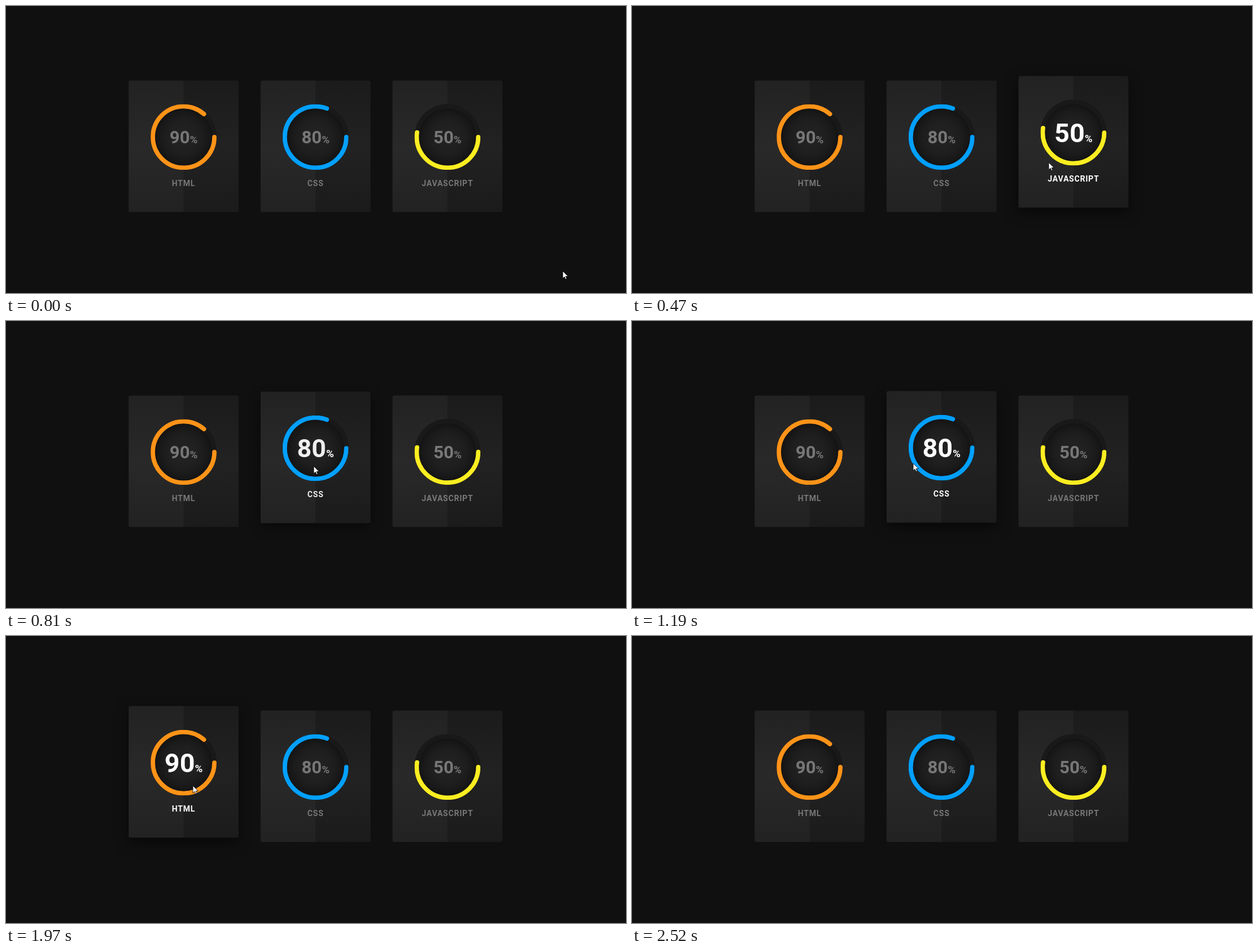
These frames come from a looping animation (1098 px wide and 510 px high, 2.57 s). An HTML page:

```html
<!DOCTYPE html>
<html lang="en">
<head>
<meta charset="utf-8">
<title>Skill cards</title>
<style>
  html, body { margin: 0; width: 100%; height: 100%; overflow: hidden; background: #101010; }
  body { position: relative; font-family: Roboto, sans-serif; font-weight: 700; }
  #row { position: absolute; left: 0; top: 0; transform-origin: 0 0; }
  .card { position: absolute; top: 0; width: 250px; height: 300px; border-radius: 4px;
    background: linear-gradient(#1b1b1b, #222, #1b1b1b); }
  .card::before { content: ""; position: absolute; left: 0; top: 0; width: 50%; height: 100%;
    border-radius: 4px 0 0 4px; background: rgba(255, 255, 255, .03); }
  .dial { position: absolute; left: 50px; top: 54px; width: 150px; height: 150px; border-radius: 50%;
    background: #222; box-shadow: inset 0 0 50px #000; }
  .dial svg { position: absolute; left: 0; top: 0; }
  circle { fill: none; stroke-width: 10; stroke-linecap: round; }
  text { text-anchor: middle; }
  tspan { font-size: 24px; }
  .label { position: absolute; left: 0; top: 225px; width: 100%; text-align: center;
    font-size: 18px; line-height: 20px; letter-spacing: 1px; }
  #cursor { position: absolute; left: 0; top: 0; }
</style>
</head>
<body>
<div id="row"></div>
<svg id="cursor" width="12" height="18" viewBox="-1 -1 12 18">
  <path d="M0 0V13L3 10.2L5 14.6L7 13.7L5.1 9.5H9.3Z" fill="#fff" stroke="#000" stroke-width=".8"/>
</svg>
<script>
const LOOP = 2570, FADE = 155, LAG = 5;
const SCALE = .7788, LEFT = 217.2, TOP = 132.4, PITCH = 300;

const cards = [
  { name: 'HTML', value: 90, arc: 86.5, color: '#ff9318' },
  { name: 'CSS', value: 80, arc: 81, color: '#03a0ff' },
  { name: 'JAVASCRIPT', value: 50, arc: 52.4, color: '#fcee21' }
];

const smooth = x => x * x * (3 - 2 * x);
const speedUp = n => x => x ** n;

// pointer strokes; each begins where the last one ended
const home = [986, 471];
const strokes = [
  { start: 0, end: 470, to: [738, 278], pace: smooth },
  { start: 575, end: 905, to: [498, 253], pace: smooth },
  { start: 1130, end: 1450, to: [331, 266], pace: speedUp(9) },
  { start: 1970, end: 2310, to: [1077, 511], bend: [420, 420], pace: speedUp(4) }
];

function pointer(t) {
  let at = home;
  for (const { start, end, to, bend, pace } of strokes) {
    if (t < start) break;
    const u = pace(Math.min(1, (t - start) / (end - start)));
    at = at.map((a, i) => {
      const mid = bend ? bend[i] : (a + to[i]) / 2;
      return (1 - u) ** 2 * a + 2 * u * (1 - u) * mid + u * u * to[i];
    });
  }
  return at;
}

function isOver(i, [x, y]) {
  const dx = (x - LEFT) / SCALE - i * PITCH, dy = (y - TOP) / SCALE;
  return dx >= 0 && dx <= 250 && dy >= 0 && dy <= 300;
}

// times at which the pointer enters or leaves card i
function crossings(i) {
  const list = [];
  for (let t = 0, was = false; t < LOOP; t++) {
    const now = isOver(i, pointer(t));
    if (now !== was) list.push({ time: t + LAG, to: +now });
    was = now;
  }
  return list;
}

// cubic-bezier(.25, .1, .25, 1)
function ease(x) {
  if (x <= 0) return 0;
  if (x >= 1) return 1;
  const bezier = (a, b, u) => 3 * a * u * (1 - u) ** 2 + 3 * b * u * u * (1 - u) + u ** 3;
  let lo = 0, hi = 1;
  for (let i = 0; i < 24; i++) {
    const mid = (lo + hi) / 2;
    if (bezier(.25, .25, mid) < x) lo = mid; else hi = mid;
  }
  return bezier(.1, 1, lo);
}

function hoverState(events, t) {
  let level = 0, on = 0;
  events.forEach(({ time, to }, i) => {
    if (t < time) return;
    const next = events[i + 1];
    const until = next ? Math.min(t, next.time) : t;
    level += (to - level) * ease((until - time) / FADE);
    on = to;
  });
  return { level, on };
}

const row = document.getElementById('row');
const cursor = document.getElementById('cursor');
row.style.transform = `translate(${LEFT}px, ${TOP}px) scale(${SCALE})`;

cards.forEach((c, i) => {
  const ring = attrs => `<circle cx="75" cy="75" r="70" ${attrs}/>`;
  const el = document.createElement('div');
  el.className = 'card';
  el.style.left = i * PITCH + 'px';
  el.innerHTML = `<div class="dial"><svg width="150" height="150">
    ${ring('stroke="#191919"')}
    ${ring(`stroke="${c.color}" pathLength="100" stroke-dasharray="${c.arc} 100"`)}
    <text x="75">${c.value}<tspan>%</tspan></text></svg></div>
    <div class="label">${c.name}</div>`;
  row.append(el);
  Object.assign(c, {
    el,
    num: el.querySelector('text'),
    sign: el.querySelector('tspan'),
    label: el.querySelector('.label'),
    events: crossings(i)
  });
});

function draw(t) {
  for (const c of cards) {
    const { level, on } = hoverState(c.events, t);
    const grey = Math.round(119 + 136 * level);
    const tone = `rgb(${grey},${grey},${grey})`;
    const size = 40 + 20 * level;
    c.el.style.transform = `translateY(${-10 * level}px)`;
    c.el.style.boxShadow = `0 ${10 * level}px ${30 * level}px rgba(0,0,0,${.55 * level})`;
    c.num.style.fontSize = size + 'px';
    c.num.setAttribute('y', 75 + .36 * size);
    c.num.style.fill = c.label.style.color = tone;
    c.sign.style.fill = on ? '#fff' : '#777';
  }
  const [x, y] = pointer(t).map(Math.round);
  cursor.style.transform = `translate(${x - 1}px, ${y - 1}px)`;
}

const begin = performance.now();
function tick() {
  const t = (performance.now() - begin) % LOOP;
  draw(t > 1450 && t < 1510 ? 1450 : t); // short hold
  requestAnimationFrame(tick);
}
tick();
</script>
</body>
</html>
```
